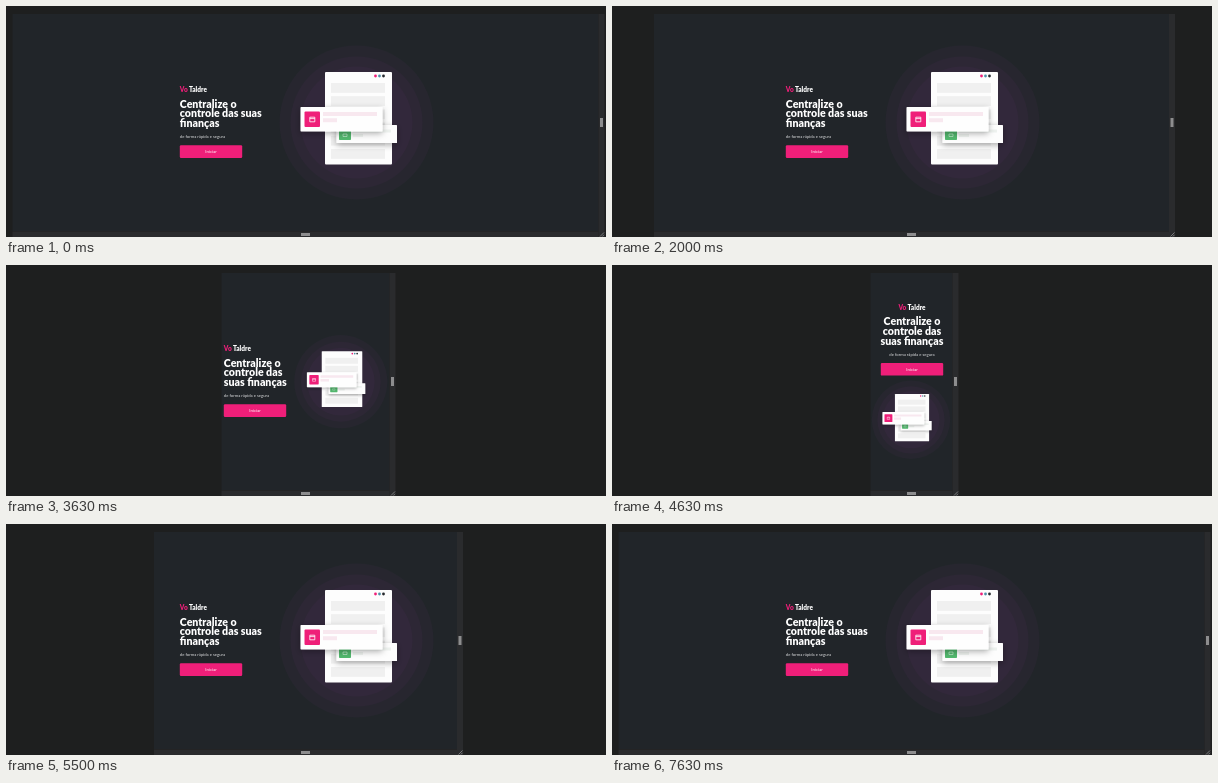
These frames come from a looping animation (600 by 231 pixels, 8000 ms). An HTML page:

```html
<!DOCTYPE html>
<html lang="pt-BR">
<head>
<meta charset="utf-8">
<title>Página responsiva</title>
<style>
  html, body { margin: 0; height: 100%; overflow: hidden; background: #1e1f1f; }
  svg { display: block; width: 100vw; height: 100vh; }
  text { font-family: Lato, sans-serif; fill: #fff; }
  .logo { font-size: 6.5px; font-weight: 900; }
  .title { font-size: 10.6px; font-weight: 900; }
  .sub { font-size: 4.2px; fill: #dfe0e2; }
  .label { font-size: 4.4px; text-anchor: middle; }
  .pink { fill: #ef1f79; }
  .bar { fill: #2a2b2d; }
  .handle { fill: #8d8d8e; }
</style>
</head>
<body>
<svg viewBox="0 0 600 231">
  <defs>
    <filter id="shadow" x="-20%" y="-40%" width="140%" height="200%">
      <feDropShadow dx="0" dy="2" stdDeviation="3" flood-color="#000" flood-opacity=".32"/>
    </filter>
  </defs>

  <rect id="page" y="8" height="217" fill="#212529"/>
  <rect id="sideBar" class="bar" y="8" width="6" height="223"/>
  <rect id="bottomBar" class="bar" y="225.5" height="5.5"/>
  <rect class="handle" x="295" y="227" width="9" height="3"/>
  <g id="grip">
    <rect class="handle" x="1.5" y="112" width="3" height="9"/>
    <path d="M1.5 230.5l4-4M3.8 230.5l1.7-1.7" stroke="#8d8d8e" stroke-width=".8"/>
  </g>

  <!-- Illustration, centred on its rings -->
  <g id="art">
    <g fill="#713a86">
      <circle r="77" opacity=".07"/>
      <circle r="66" opacity=".08"/>
      <circle r="56" opacity=".08"/>
    </g>
    <rect x="-31.5" y="-50.5" width="67" height="92.5" rx="1" fill="#fdfdfd"/>
    <circle class="pink" cx="19" cy="-46.5" r="1.4"/>
    <circle cx="23" cy="-46.5" r="1.4" fill="#4f8fa8"/>
    <circle cx="27" cy="-46.5" r="1.4" fill="#25282c"/>
    <g id="rows" fill="#f0f0f0"></g>
    <g filter="url(#shadow)">
      <rect x="-20" y="2.5" width="60.5" height="18" rx=".6" fill="#fdfdfd"/>
    </g>
    <rect x="-17.5" y="5.5" width="12" height="12" rx=".8" fill="#53b86e"/>
    <path d="M-13.5 14v-2.5h4V14z" fill="none" stroke="#d5f0dc" stroke-width=".6"/>
    <path d="M-3.5 7h38v3h-38zM-3.5 11.5h10v3h-10z" fill="#eef2ef"/>
    <g filter="url(#shadow)">
      <rect x="-56" y="-15.5" width="82" height="24.5" rx=".8" fill="#fefefe"/>
    </g>
    <rect class="pink" x="-52" y="-11" width="15.5" height="15.5" rx="1"/>
    <path d="M-46.7 -5.3h5v4.6h-5zM-46.7 -3.9h5" fill="none" stroke="#fff" stroke-width=".8"/>
    <path d="M-33.5 -10.5h54v4h-54zM-33.5 -4.3h14v4h-14z" fill="#f8e8ef"/>
  </g>

  <g id="copy">
    <text class="logo" y="86"><tspan class="pink">Vo</tspan> Taldre</text>
    <text class="title" y="101.6"></text>
    <text class="title" y="111.4"></text>
    <text class="title" y="121.2"></text>
    <text class="sub" y="132.2">de forma rápida e segura</text>
  </g>
  <g id="button">
    <rect class="pink" x="-31.2" y="139.3" width="62.4" height="12.7" rx="1.2"/>
    <text class="label" y="147.2">Iniciar</text>
  </g>
</svg>

<script>
const LOOP = 8000, STEP = 125, CENTER = 299.5;
const $ = id => document.getElementById(id);

// [time in ms, half of the page width]
const widths = [
  [0, 293], [1500, 293], [2000, 257.5], [2250, 240], [2625, 211], [3000, 181.5],
  [3625, 84], [4125, 41], [4750, 41], [5500, 151.5], [5625, 158], [6000, 165],
  [6125, 170], [7000, 293], [LOOP, 293]
];

const narrowTitle = ["Centralize o", "controle das", "suas finanças"];
const layouts = [
  { min: 131, x: 173.8, anchor: "start", dy: 0, button: 205, art: [350.5, 116.5, 1],
    title: ["Centralize o", "controle das suas", "finanças"] },
  { min: 82, x: 217.8, anchor: "start", dy: 0, button: 249, art: [334.8, 116.7, .605],
    title: narrowTitle },
  { min: 0, x: 300, anchor: "middle", dy: -41.4, button: 300, art: [299, 154.8, .51],
    title: narrowTitle }
];

$("rows").innerHTML = Array.from({ length: 6 }, (_, i) =>
  `<rect x="-25.5" y="${-39.5 + 13.2 * i}" width="54" height="9.8"/>`).join("");

function halfWidth(t) {
  const i = widths.findIndex(([time]) => time > t);
  const [t0, w0] = widths[i - 1], [t1, w1] = widths[i];
  return w0 + (w1 - w0) * (t - t0) / (t1 - t0);
}

function set(id, attributes) {
  for (const name in attributes) $(id).setAttribute(name, attributes[name]);
}

let current;
function applyLayout(layout) {
  if (layout === current) return;
  current = layout;
  const [x, y, scale] = layout.art;
  set("art", { transform: `translate(${x} ${y}) scale(${scale})` });
  set("copy", { transform: `translate(${layout.x} ${layout.dy})`, "text-anchor": layout.anchor });
  set("button", { transform: `translate(${layout.button} ${layout.dy})` });
  document.querySelectorAll(".title").forEach((line, i) => line.textContent = layout.title[i]);
}

function draw(now) {
  const t = Math.floor(now % LOOP / STEP) * STEP;
  const half = halfWidth(t), left = CENTER - half, right = CENTER + half;
  set("page", { x: left, width: 2 * half });
  set("sideBar", { x: right });
  set("bottomBar", { x: left, width: 2 * half });
  set("grip", { transform: `translate(${right} 0)` });
  applyLayout(layouts.find(layout => half > layout.min));
  requestAnimationFrame(draw);
}
draw(performance.now());
</script>
</body>
</html>
```
